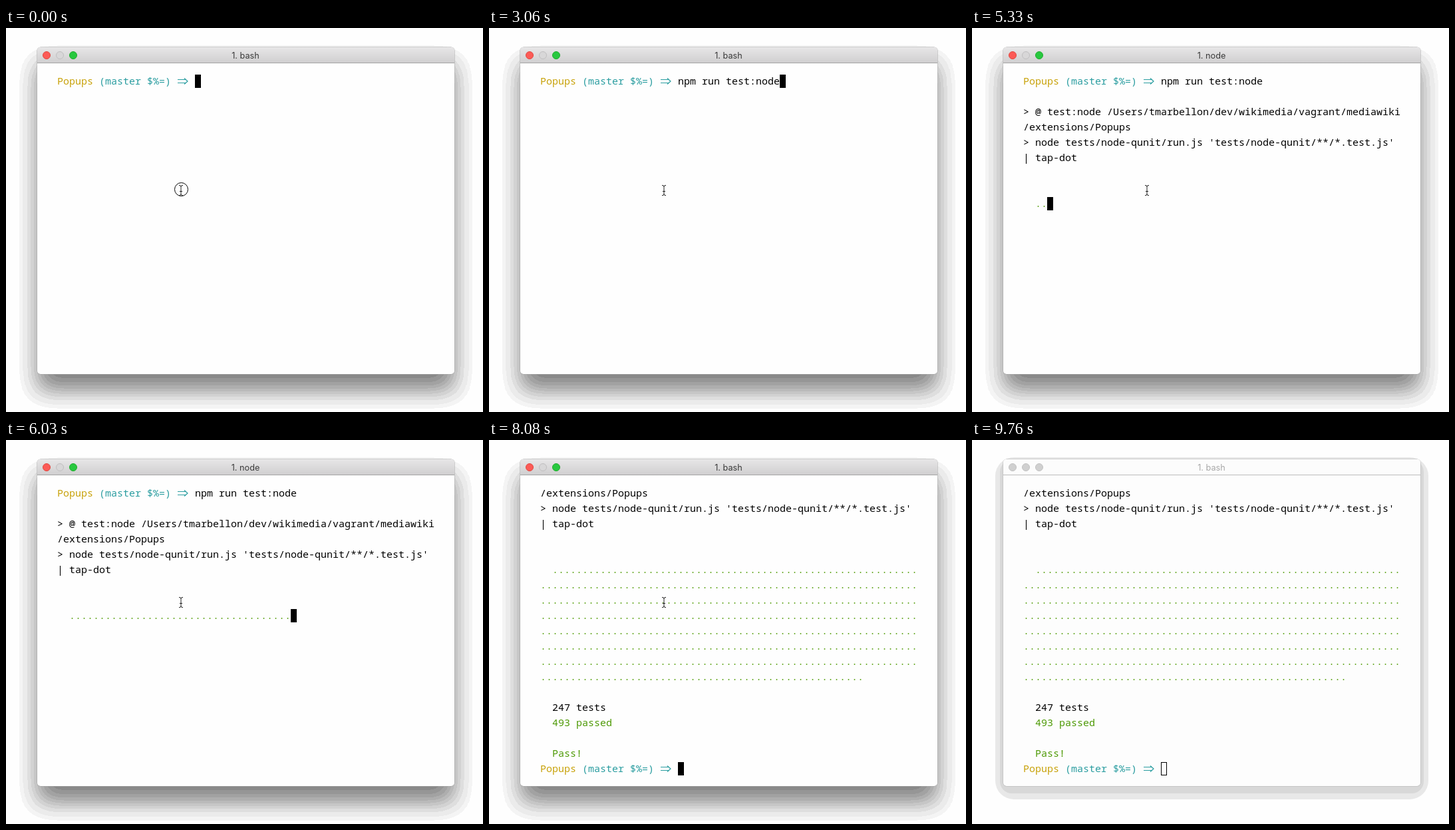
Write an HTML page that moves like this. It is 717 by 577 pixels and loops after 9860 ms.

```html
<!DOCTYPE html>
<html lang="en">
<head>
<meta charset="utf-8">
<title>Terminal</title>
<style>
html, body { margin: 0; width: 100%; height: 100%; overflow: hidden; background: #fefefe; }
svg { display: block; }
#screen text { font: 15px "Noto Sans Mono", monospace; white-space: pre; font-variant-ligatures: none; }
#title { font: 12.7px Inter, sans-serif; text-anchor: middle; }
</style>
</head>
<body>
<svg width="717" height="577" viewBox="0 0 717 577">
  <defs>
    <linearGradient id="barFill" x2="0" y2="1">
      <stop stop-color="#e7e6e7"/><stop offset="1" stop-color="#d0cfd0"/>
    </linearGradient>
    <filter id="bands" filterUnits="userSpaceOnUse" x="-40" y="-20" width="800" height="680">
      <feGaussianBlur stdDeviation="17.7"/>
      <feComponentTransfer><feFuncA id="steps" type="discrete"/></feComponentTransfer>
    </filter>
  </defs>
  <rect id="activeShadow" x="47" y="53.5" width="627" height="491" fill-opacity=".5" filter="url(#bands)"/>
  <g id="idleShadow">
    <rect x="35" y="26" width="651" height="514" rx="28" fill="#e8e8e8"/>
    <rect x="42" y="30" width="637" height="501" rx="18" fill="#d8d8d8"/>
  </g>
  <rect id="frame" x="46.5" y="28.5" width="628" height="492" rx="5.5"/>
  <rect id="page" x="47" y="29" width="627" height="491" rx="5"/>
  <path id="bar" d="M47 52V34q0-5 5-5H669q5 0 5 5V52z"/>
  <path id="rule" d="M47 52.5H674"/>
  <g id="lights"></g>
  <text id="title" x="360" y="46"></text>
  <g id="screen"></g>
  <rect id="caret" stroke="#000"/>
  <circle id="ring" cx="263.5" cy="242.5" r="10" fill="none" stroke="#000"/>
  <path id="beam" fill="none" stroke="#222" d="M-3-7.5h1q2 0 2 2v11q0 2-2 2h-1M3-7.5h-1q-2 0-2 2M3 7.5h-1q-2 0-2-2M-2 1.5h4"/>
  <path id="arrow" fill="#000" stroke="#fff" d="M0 0v15l3.5-3.2 2.4 5.6 2.6-1.1-2.4-5.5h4.8z"/>
</svg>
<script>
const LOOP = 9860, COLS = 63, ROWS = 19, CELL = 9, LINE = 23, LEFT = 77, TOP = 70;
const BLACK = '#000', GOLD = '#c8a20a', TEAL = '#2a9da0', GREEN = '#4e9a06', DOT = '#58a010';
const COMMAND = 'npm run test:node';
const OUTPUT = [
  '> @ test:node /Users/tmarbellon/dev/wikimedia/vagrant/mediawiki',
  '/extensions/Popups',
  "> node tests/node-qunit/run.js 'tests/node-qunit/**/*.test.js'",
  '| tap-dot'
];
// [time, characters shown]
const TYPING = [[750, 1], [930, 2], [1110, 3], [1230, 4], [1470, 5], [1520, 6], [1820, 8], [2000, 9],
  [2110, 10], [2230, 12], [2530, 13], [2710, 14], [2770, 15], [2820, 16], [3060, 17]];
const DOTS = [[5330, 2], [5450, 4], [5620, 5], [5740, 6], [5920, 15], [5980, 26], [6030, 37],
  [6450, 383], [6680, 387], [6800, 391], [6970, 440], [7030, 493]];
// [time, x, y]
const MOUSE = [[0, 263, 244], [8980, 270, 237], [9040, 335, 204], [9090, 445, 192],
  [9150, 560, 238], [9200, 640, 345], [9260, 698, 470], [9310, 740, 560], [9490, 709.5, 562.5], [9550, 740, 600]];

const el = id => document.getElementById(id);
const set = (id, attrs) => { for (const k in attrs) el(id).setAttribute(k, attrs[k]); };
const show = (id, on) => set(id, { visibility: on ? 'visible' : 'hidden' });
const latest = (list, t) => list.filter(s => s[0] <= t).pop();
const count = (list, t) => (latest(list, t) || [0, 0])[1];

// Uneven grey bands of the window shadow
el('steps').setAttribute('tableValues', Array.from({ length: 42 }, (_, k) =>
  k < 2 ? k * .043 : ((k >> 1) * 2 + 1) / 42 + .007).join(' '));

function dotCount(t) {
  if (t >= 6030 && t < 6450) return Math.round(37 + 346 * Math.floor((t - 6030) / 60) / 7);
  return count(DOTS, t);
}

function terminal(t) {
  const parts = [];
  const put = (row, col, text, color = BLACK) => parts.push({ row, col, text, color });
  const prompt = row => {
    put(row, 0, 'Popups', GOLD);
    put(row, 7, '(master $%=)', TEAL);
    put(row, 20, null, TEAL);
  };
  const typed = count(TYPING, t), dots = dotCount(t);
  let row = 0, col = 23 + typed;
  prompt(0);
  put(0, 23, COMMAND.slice(0, typed));
  if (t >= 3110) [row, col] = [1, 0];
  if (t >= 3470) {
    OUTPUT.forEach((line, i) => put(2 + i, 0, line));
    row = t < 3590 ? 7 : 8;
  }
  if (dots) {
    const end = dots + 2;
    row = 8 + Math.floor(end / COLS);
    col = end % COLS;
    for (let r = 8; r <= row; r++) {
      const from = r === 8 ? 2 : 0;
      put(r, from, '.'.repeat((r === row ? col : COLS) - from), DOT);
    }
  }
  if (t >= 7210) {
    put(17, 2, '247 tests');
    put(18, 2, '493 passed', GREEN);
    put(20, 2, 'Pass!', GREEN);
    [row, col] = [21, 0];
  }
  if (t >= 7390) {
    prompt(21);
    col = 23;
  }
  return { parts, row, col, scroll: Math.max(0, row - ROWS + 1) };
}

function markup({ row, col, text, color }, scroll) {
  const x = LEFT + col * CELL, y = TOP + (row - scroll) * LINE;
  if (row < scroll) return '';
  return text === null
    ? `<path d="M${x + 1} ${y + 7.5}h12.5m-12.5 5h12.5m-2.5-7l5 4.5-5 4.5" fill="none" stroke="${color}" stroke-width="1.2"/>`
    : `<text x="${x}" y="${y + 15}" fill="${color}">${text}</text>`;
}

let drawn = '';
function render(t) {
  const idle = t >= 9760;
  const { parts, row, col, scroll } = terminal(t);
  const html = parts.map(p => markup(p, scroll)).join('');
  if (html !== drawn) el('screen').innerHTML = drawn = html;

  set('caret', {
    x: LEFT + col * CELL + .5, y: TOP + (row - scroll) * LINE + .5,
    width: CELL - 1, height: 19, fill: idle ? 'none' : BLACK
  });

  el('title').textContent = t >= 3830 && t < 8080 ? '1. node' : '1. bash';
  set('title', { fill: idle ? '#a8a8a8' : '#3a3a3a' });
  show('activeShadow', !idle);
  show('idleShadow', idle);
  set('frame', { fill: idle ? '#b4b4b4' : '#a6a6a6' });
  set('page', { fill: idle ? '#fdfdfd' : '#fefefe' });
  set('bar', { fill: idle ? '#fcfcfc' : 'url(#barFill)' });
  set('rule', { stroke: idle ? '#bcbcbc' : '#a4a4a4' });
  const lights = idle ? Array(3).fill(['#d0d0d0', '#c2c2c2'])
    : [['#fc5b57', '#e2463f'], ['#d8d7d8', '#c0bfc0'], ['#28c83f', '#1dad2b']];
  el('lights').innerHTML = lights.map(([fill, edge], i) =>
    `<circle cx="${61 + 20 * i}" cy="41" r="5.5" fill="${fill}" stroke="${edge}"/>`).join('');

  const [, mx, my] = latest(MOUSE, t);
  const outside = mx > 674;
  show('ring', t < 60);
  show('beam', !outside);
  show('arrow', outside);
  set(outside ? 'arrow' : 'beam', { transform: `translate(${mx} ${my})` });
}

const start = performance.now();
function tick() {
  render((performance.now() - start) % LOOP);
  requestAnimationFrame(tick);
}
tick();
</script>
</body>
</html>
```
